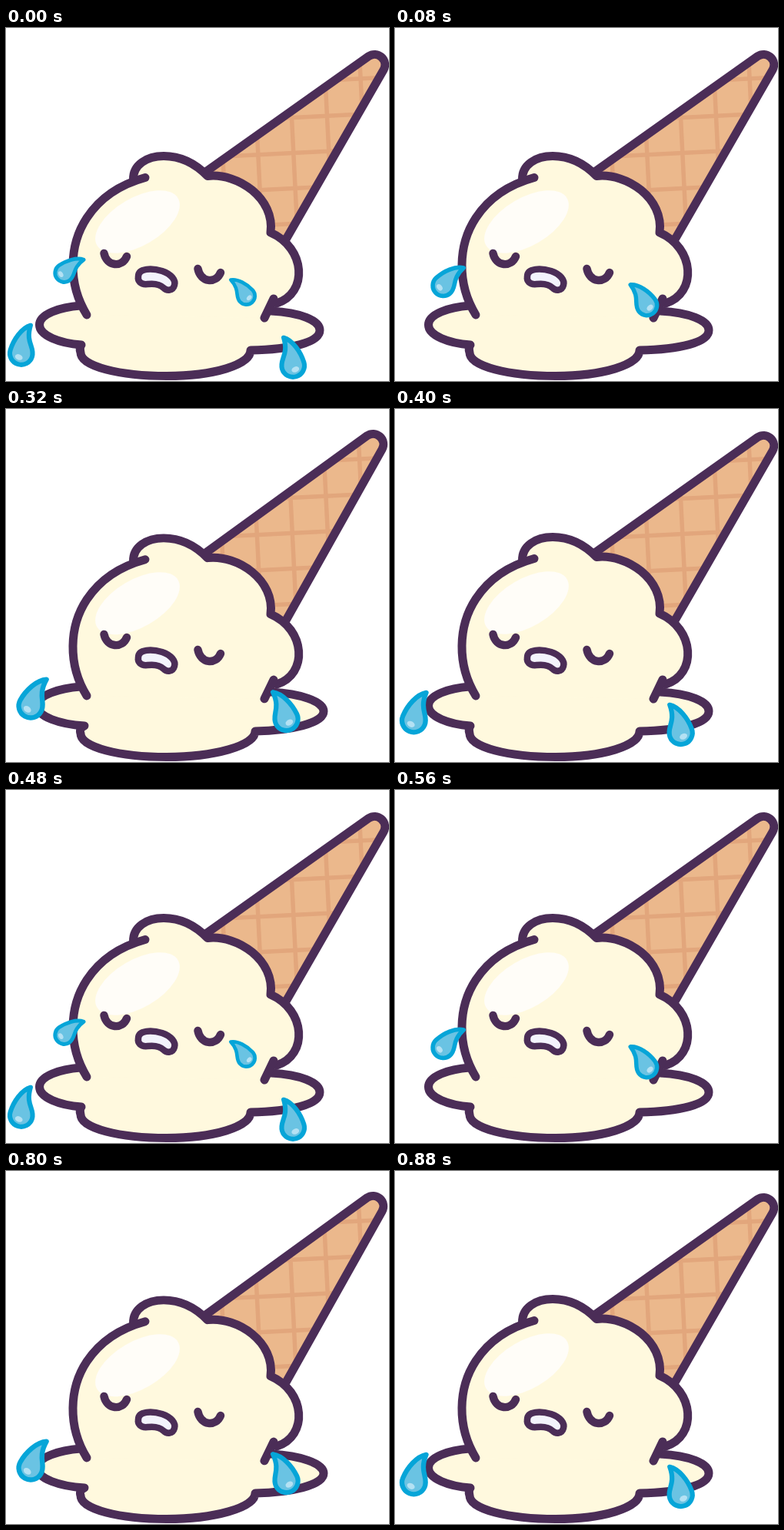
Recreate the animation shown at these times as an HTML page with a canvas. Size 498x459 px, loop 960 ms.

```html
<!DOCTYPE html>
<html lang="en">
<head>
<meta charset="utf-8">
<title>Melting ice cream</title>
<style>
  html, body { margin: 0; width: 100%; height: 100%; overflow: hidden; background: #fff; }
  canvas { display: block; }
</style>
</head>
<body>
<canvas id="stage" width="498" height="459"></canvas>
<script>
const ctx = document.getElementById('stage').getContext('2d');
const STEP_MS = 80, STEPS = 6;
const INK = '#4b2d57', CREAM = '#fff9de';
ctx.lineCap = ctx.lineJoin = 'round';

const fill = (d, color) => { ctx.fillStyle = color; ctx.fill(new Path2D(d)); };
const stroke = (d, width = 11, color = INK) => {
  ctx.strokeStyle = color;
  ctx.lineWidth = width;
  ctx.stroke(new Path2D(d));
};
const ellipse = (x, y, rx, ry, angle, color) => {
  ctx.fillStyle = color;
  ctx.beginPath();
  ctx.ellipse(x, y, rx, ry, angle, 0, Math.PI * 2);
  ctx.fill();
};
const isolated = draw => { ctx.save(); draw(); ctx.restore(); };

// wide is 1 while the puddle is spread out, otherwise 0
function drawCone(wide) {
  const s = 2 * wide;
  const cone = `M259 187.5 L${471.5 - s} ${36.8 - s} A13.5 13.5 0 0 1 ${491 - s} ${54.4 - s} L364.5 274`;
  const inside = cone + 'L300 260Z';
  fill(inside, '#ebb88c');
  isolated(() => {
    ctx.clip(new Path2D(inside));
    ctx.translate(371.5 - 1.5 * wide, 116.5 - wide);
    ctx.rotate(-0.05);
    for (let i = -3; i <= 3; i++) {
      const p = i * 46;
      stroke(`M-200 ${p}H200 M${p} -200V200`, 5.5, '#e2a67c');
    }
  });
  stroke(cone);
}

function drawPuddle(wide) {
  const left = 43.5 - 3 * wide, right = 408 + 5 * wide;
  const bowlRight = 318 + 6 * wide, notch = 98 + 4 * wide;
  const leftLip = `M97 361 C70 363 ${left} 372 ${left} 386 C${left} 400 70 410 ${notch} 412`;
  const bowl = `C95 416 96 419 97 422 C97 440 148 452.5 209 452.5 C270 452.5 ${bowlRight} 438 ${bowlRight} 419`;
  const rightLip = `C370 418 ${right} 409 ${right} 393 C${right} 380 382 370 345 368`;
  const outline = leftLip + bowl + rightLip;
  fill(outline, CREAM);
  stroke(outline);
}

function drawHead(wide) {
  const side = 'M105 373 C80 332 82 282 105 247 C124 218 150 203 181 194.5';
  const top = '165.5 197 C165 178 183 166.5 205 166.5 C230 166.5 248 178 262 192.5';
  const lobes = 'C302 188 350 222 344 266 C390 286 393 345 352 358';
  isolated(() => {
    ctx.translate(0, 360);
    ctx.scale(1, 1 - 0.007 * wide);
    ctx.translate(0, -360);
    fill(`${side} L${top} ${lobes} L336 377Z`, CREAM);
    ellipse(171, 252, 61, 31, -0.53, '#fffdf8');
    stroke(side);
    stroke(`M${top} ${lobes}`);
    stroke('M348 352 L336 377');
  });
}

function drawFace() {
  stroke('M127.5 293 C131 310 151 312 157 297', 10.5);
  stroke('M249.5 313 C253 331 273 333 279 318', 10.5);
  const mouth = 'M172 323 C172 312 190 312 203 316 C215 320 221 328 219 334.5 ' +
    'C217 342 209 342 205 338 C200 333 192 332 184 333 C175 334 171 329 172 323Z';
  fill(mouth, '#f3f3fc');
  stroke(mouth, 8.5);
}

// [step, tip x, tip y, bulb x, bulb y]
const LEFT_PATH = [
  [0, 103, 299, 75, 319], [2, 79, 319, 49, 352], [4, 53.5, 348, 31.5, 387],
  [5, 41, 365, 24, 406], [6, 32, 383, 19.5, 424]
];
const RIGHT_PATH = [
  [0, 291, 325, 313, 349], [2, 319, 336.5, 343, 373.5], [4, 346.5, 364.5, 365, 404],
  [5, 357, 381, 372, 422], [6, 361, 399, 373.5, 440]
];

function along(path, step) {
  const i = Math.max(1, path.findIndex(key => key[0] >= step));
  const a = path[i - 1], b = path[i];
  const u = (step - a[0]) / (b[0] - a[0]);
  return a.map((v, j) => v + (b[j] - v) * u);
}

function drawTear(path, step, flip) {
  const [, tipX, tipY, x, y] = along(path, step);
  const dx = tipX - x, dy = tipY - y;
  const size = Math.hypot(dx, dy) / 42;
  const drop = 'M1 -38.5 C-9 -32 -14.5 -15 -14.5 -1 A14.5 14.5 0 0 0 14.5 -1 C14.5 -14 1 -15 1 -38.5Z';
  isolated(() => {
    ctx.translate(x, y);
    ctx.rotate(Math.atan2(dx, -dy));
    ctx.scale(flip * size, size);
    fill(drop, '#6ac3e3');
    stroke(drop, 6, '#06a5d8');
    ellipse(-1.5, 4.5, 5, 3.5, 0.1, '#b4e1f3');
  });
}

function drawTears(step) {
  drawTear(LEFT_PATH, step, 1);
  drawTear(RIGHT_PATH, step, -1);
}

function render(now) {
  const step = Math.floor(now / STEP_MS) % STEPS;
  const wide = step >= 2 && step <= 4 ? 1 : 0;
  ctx.fillStyle = '#fff';
  ctx.fillRect(0, 0, 498, 459);
  drawCone(wide);
  drawPuddle(wide);
  drawHead(wide);
  drawFace();
  drawTears(step);
  if (step === 0) drawTears(STEPS);
}

const start = performance.now();
function loop() {
  render(performance.now() - start);
  requestAnimationFrame(loop);
}
loop();
</script>
</body>
</html>
```
